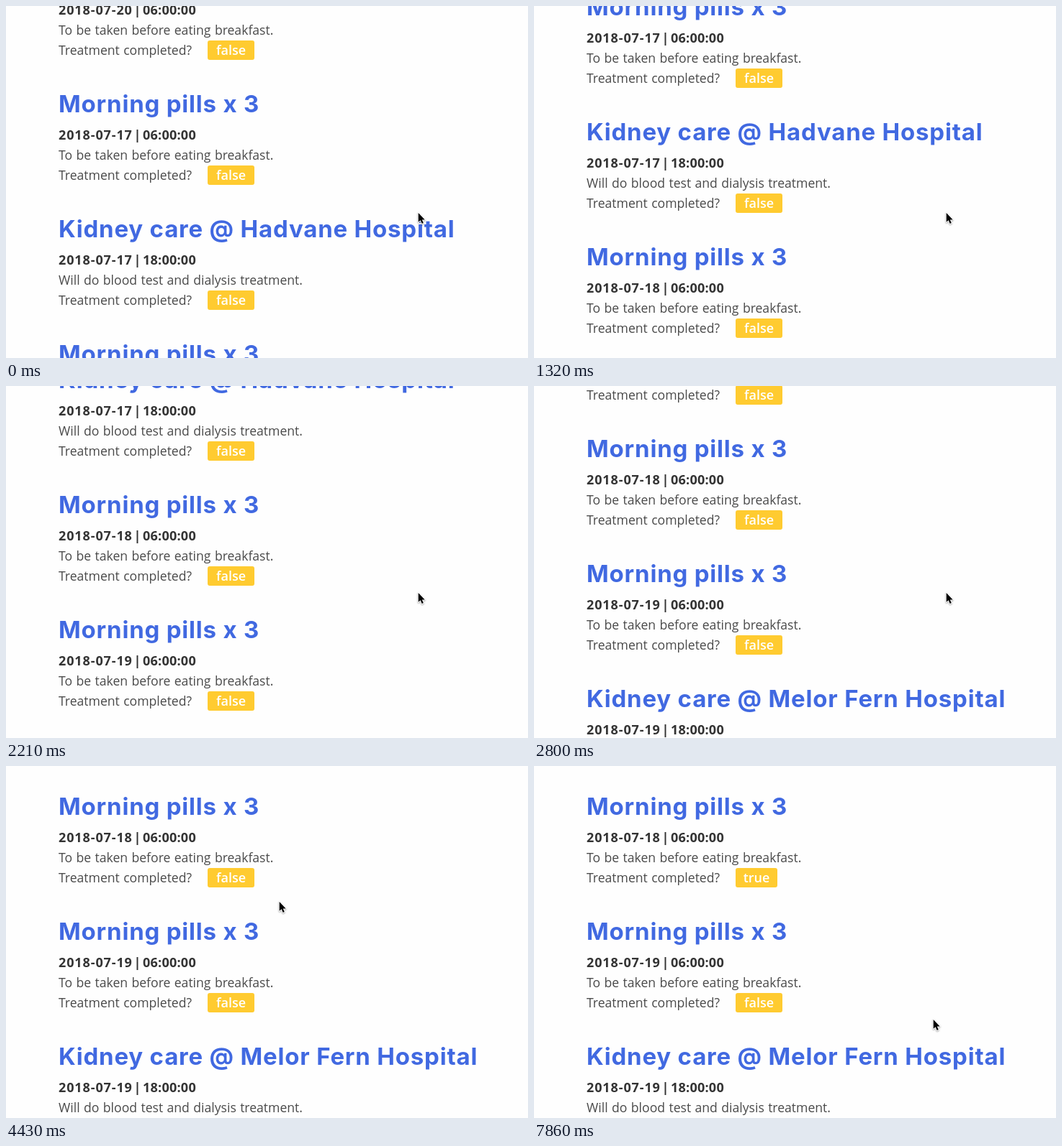
These frames come from a looping animation (725 px wide and 490 px high, 8 s). An HTML page with a canvas:

```html
<!DOCTYPE html>
<html lang="en">
<head>
<meta charset="utf-8">
<title>Treatment list</title>
<style>
  html, body { margin: 0; width: 100%; height: 100%; overflow: hidden; background: #fefefe; }
  canvas { display: block; }
</style>
</head>
<body>
<canvas id="stage" width="725" height="490"></canvas>
<script>
const ctx = document.getElementById('stage').getContext('2d');
const LOOP = 8000, STEP = 147;
const LEFT = 73, PITCH = 174, FIRST = -26;
const BODY = '"Open Sans", "Noto Sans", sans-serif';
const TITLE = '700 33px Inter, "Open Sans", sans-serif';
const BOLD = '700 18px ' + BODY, PLAIN = '400 17.6px ' + BODY, LABEL = '600 18px ' + BODY;

const pills = day => ({ title: 'Morning pills x 3', note: 'To be taken before eating breakfast.', day, time: '06:00:00' });
const care = (place, day) => ({ title: 'Kidney care @ ' + place, note: 'Will do blood test and dialysis treatment.', day, time: '18:00:00' });
const entries = [
  pills(20), pills(17), care('Hadvane Hospital', 17),
  pills(18), pills(19), care('Melor Fern Hospital', 19)
];
const TOGGLED = 3;
const HOVER_ON = 5930, HOVER_OFF = 7120, DONE = 6520;

const easeOut = p => 1 - (1 - p) ** 1.8;
const smooth = p => p * p * (3 - 2 * p);

// Each move: when it starts, how many steps it takes, where it ends.
const scroll = { from: [0], ease: easeOut, moves: [
  { start: 150, steps: 5, to: [76.5] },
  { start: 1320, steps: 7, to: [319] },
  { start: 2650, steps: 4, to: [428] }
] };
const pointer = { from: [572, 287], ease: smooth, moves: [
  { start: 3840, steps: 7, to: [331, 163] },
  { start: 7120, steps: 3, to: [412, 230] },
  { start: 7710, steps: 2, to: [554, 352] }
] };

function follow({ from, ease, moves }, t) {
  let pos = from;
  for (const { start, steps, to } of moves) {
    if (t < start) break;
    const step = Math.floor((t - start + 8) / STEP) + 1;
    const p = ease(Math.min(1, step / steps));
    pos = pos.map((v, i) => v + (to[i] - v) * p);
  }
  return pos.map(Math.round);
}

function text(str, x, y, font, color, { spacing = 0, words = 0, align = 'left' } = {}) {
  ctx.font = font;
  ctx.fillStyle = color;
  ctx.letterSpacing = spacing + 'px';
  ctx.wordSpacing = words + 'px';
  ctx.textAlign = align;
  ctx.fillText(str, x, y);
}

function button(y, done, hover) {
  const w = done ? 58 : 65;
  ctx.fillStyle = hover ? '#ffda5b' : '#ffcb30';
  ctx.beginPath();
  ctx.roundRect(280, y, w, 27, 3);
  ctx.fill();
  text(done ? 'true' : 'false', 280 + w / 2, y + 20, LABEL, '#fff', { align: 'center' });
}

function entry({ title, note, day, time }, y, done, hover) {
  text(title, LEFT, y, TITLE, '#4169e1', { spacing: 0.8 });
  text('2018-07-' + day, LEFT, y + 38, BOLD, '#333', { spacing: 0.9 });
  text('|', 182.5, y + 38, BOLD, '#333', { align: 'center' });
  text(time, 190, y + 38, BOLD, '#333', { spacing: 0.25 });
  text(note, LEFT, y + 66, PLAIN, '#4a4a4a', { words: 0.8 });
  text('Treatment completed?', LEFT, y + 94, PLAIN, '#4a4a4a', { words: 0.8 });
  button(y + 74, done, hover);
}

const ARROW = new Path2D('M.7 1 V13.8 L3.6 11.2 L5.7 16 L7.8 15.1 L5.8 10.4 H9.7 Z');
const HAND = new Path2D(
  'M-1.6 1.2 Q-.3 -.6 1.1 1.3 L3 5.8 Q4.4 4.7 5.3 6.1 Q6.8 5.2 7.5 6.8 ' +
  'Q9.2 6.2 9.6 8 Q10.2 11 8.9 13.4 V16.6 H1.5 ' +
  'Q-.2 13.8 -2.8 11.8 Q-5 9.6 -3.3 8.8 Q-1.9 8.4 -.3 10 L-2 3.2 Z');
const CREASES = new Path2D('M2.6 11 v3 m2.1 -3 v3 m2.1 -3 v3');

function cursor(x, y, hand) {
  const shape = hand ? HAND : ARROW;
  ctx.save();
  ctx.translate(x, y);
  ctx.lineJoin = 'round';
  ctx.shadowColor = 'rgba(0,0,0,.35)';
  ctx.shadowBlur = 2;
  ctx.shadowOffsetY = 1;
  ctx.strokeStyle = '#fff';
  ctx.lineWidth = 2;
  ctx.stroke(shape);
  ctx.shadowColor = 'transparent';
  ctx.fillStyle = hand ? '#fff' : '#000';
  ctx.fill(shape);
  if (hand) {
    ctx.strokeStyle = '#000';
    ctx.lineWidth = 1.1;
    ctx.stroke(HAND);
    ctx.stroke(CREASES);
  }
  ctx.restore();
}

function draw(t) {
  ctx.fillStyle = '#fefefe';
  ctx.fillRect(0, 0, 725, 490);
  const [offset] = follow(scroll, t);
  const [x, y] = follow(pointer, t);
  entries.forEach((item, i) => {
    const mine = i === TOGGLED;
    const hover = mine && t >= HOVER_ON && t < HOVER_OFF;
    entry(item, FIRST + i * PITCH - offset, mine && t >= DONE, hover);
  });
  const onButton = x >= 280 && x <= 345 && y >= 142 && y < 169;
  cursor(x, y, onButton);
}

const start = performance.now();
function tick() {
  draw((performance.now() - start) % LOOP);
  requestAnimationFrame(tick);
}
tick();
</script>
</body>
</html>
```
